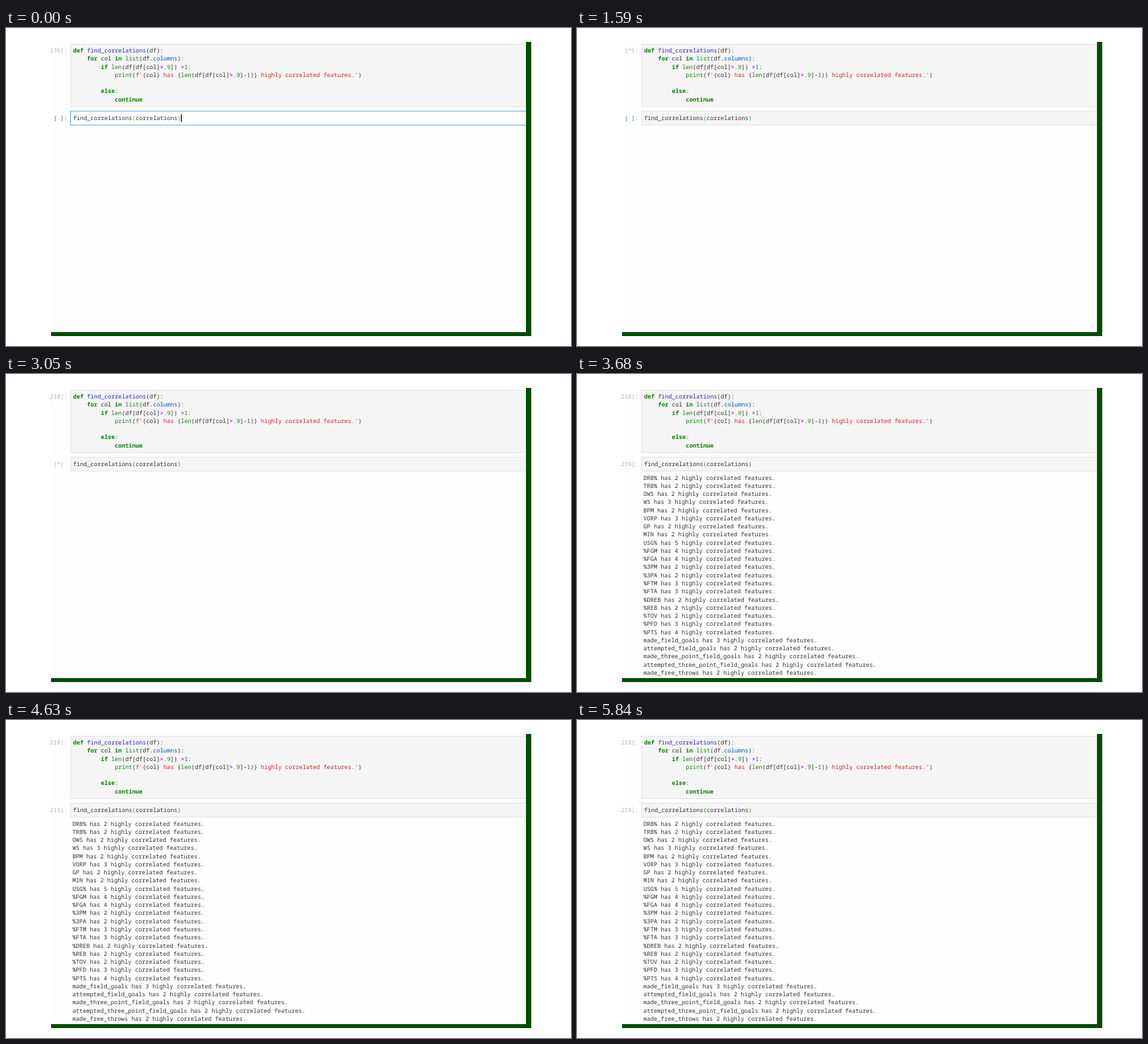
Animation, 853 px wide and 480 px high, one loop 5970 ms. Source, as an HTML page:

```html
<!DOCTYPE html>
<html lang="en">
<head>
<meta charset="utf-8">
<title>Notebook run</title>
<style>
  html, body { margin: 0; width: 100%; height: 100%; overflow: hidden; background: #fff; }
  svg { display: block; width: 853px; height: 480px; }
  text {
    font: 8.75px "Noto Sans Mono", "DejaVu Sans Mono", monospace;
    white-space: pre; fill: #303030; text-rendering: geometricPrecision;
  }
  .k { fill: #008000; font-weight: 700; }
  .d { fill: #2222dd; }
  .b, .n { fill: #118011; }
  .p { fill: #0055aa; }
  .o { fill: #aa22ff; font-weight: 700; }
  .s { fill: #c62a2a; }
  .m { fill: #00bb00; }
  .prompt { text-anchor: end; fill: #b2b2b2; }
  .prompt.on { fill: #4a7390; }
  .prompt.edit { fill: #3d8fae; }
  .cell { fill: #f5f5f5; stroke: #e2e2e2; }
  .cell.edit { fill: #fff; stroke: #62add0; }
</style>
</head>
<body>
<svg viewBox="0 0 853 480">
  <defs><clipPath id="page"><rect x="67" y="21" width="718" height="438"/></clipPath></defs>
  <rect x="68" y="21" width="725" height="444" fill="#004d00"/>
  <rect x="67" y="20" width="718" height="439" fill="#fefefe"/>
  <g clip-path="url(#page)">
    <rect class="cell" x="97.5" y="24.5" width="700" height="94"/>
    <rect class="cell" x="97.5" y="125.5" width="700" height="21"/>
    <text class="prompt" x="92.7" y="37"></text>
    <text class="prompt" x="92.7" y="139"></text>
    <g id="code"></g>
    <g id="output"></g>
    <rect id="caret" width="1.2" height="12" fill="#000"/>
  </g>
</svg>
<script>
const LOOP = 5970, LINE = 12.27;
const CLICK = 400, RUN_FIRST = 1460, DONE_FIRST = 1780, RUN_SECOND = 2860, DONE_SECOND = 3060;
const BLINK = 530;

// A letter before a backquoted part is its colour class.
const source = [
  "k`def` d`find_correlations`(df):",
  "    k`for` col k`in` b`list`(df.p`columns`):",
  "        k`if` b`len`(df[df[col]o`>`n`.9`]) o`>`n`1`:",
  "            b`print`(s`f'`{col}s` has `{b`len`(df[df[col]o`>`n`.9`]o`-`n`1`)}s` highly correlated features.'`)",
  "",
  "        k`else`:",
  "            k`continue`"
];
const call = "find_correlationsm`(`correlationsm`)`";

const counts = `DRB% 2,TRB% 2,OWS 2,WS 3,BPM 2,VORP 3,GP 2,MIN 2,USG% 5,%FGM 4,%FGA 4,
%3PM 2,%3PA 2,%FTM 3,%FTA 3,%DREB 2,%REB 2,%TOV 2,%PFD 3,%PTS 4,made_field_goals 3,
attempted_field_goals 2,made_three_point_field_goals 2,attempted_three_point_field_goals 2,
made_free_throws 2`;
const report = counts.split(",").map(entry => {
  const [name, count] = entry.trim().split(" ");
  return `${name} has ${count} highly correlated features.`;
});

const colour = line => line.replace(/([a-z])`(.*?)`/g, '<tspan class="$1">$2</tspan>');
const block = (lines, x, y) => lines.map((line, i) =>
  `<text x="${x}" y="${y + i * LINE}">${colour(line)}</text>`).join("");

const code = document.getElementById("code");
const output = document.getElementById("output");
const caret = document.getElementById("caret");
const cells = document.querySelectorAll(".cell");
const prompts = document.querySelectorAll(".prompt");

code.innerHTML = block(source, 101.2, 37) + block([call], 101.2, 139);
output.innerHTML = block(report, 100.3, 159.5);

function setCell(i, label, editing, selected) {
  cells[i].setAttribute("class", editing ? "cell edit" : "cell");
  prompts[i].setAttribute("class", "prompt" + (selected ? " on" : "") + (editing && i === 0 ? " edit" : ""));
  prompts[i].textContent = `[${label}]:`;
}

function draw(t) {
  const editSecond = t < CLICK;
  const editFirst = t >= CLICK && t < RUN_FIRST;
  const first = t < RUN_FIRST ? "176" : t < DONE_FIRST ? "*" : "218";
  const second = t < RUN_SECOND ? " " : t < DONE_SECOND ? "*" : "219";
  setCell(0, first, editFirst, editFirst);
  setCell(1, second, editSecond, editSecond || (t >= RUN_FIRST && t < RUN_SECOND));

  const lit = editSecond || (editFirst && t - CLICK < BLINK);
  caret.setAttribute("visibility", lit ? "visible" : "hidden");
  caret.setAttribute("x", editSecond ? 264 : 206.2);
  caret.setAttribute("y", editSecond ? 130 : 102);
  output.setAttribute("visibility", t >= DONE_SECOND ? "visible" : "hidden");
}

function tick() {
  draw(performance.now() % LOOP);
  requestAnimationFrame(tick);
}
tick();
</script>
</body>
</html>
```
